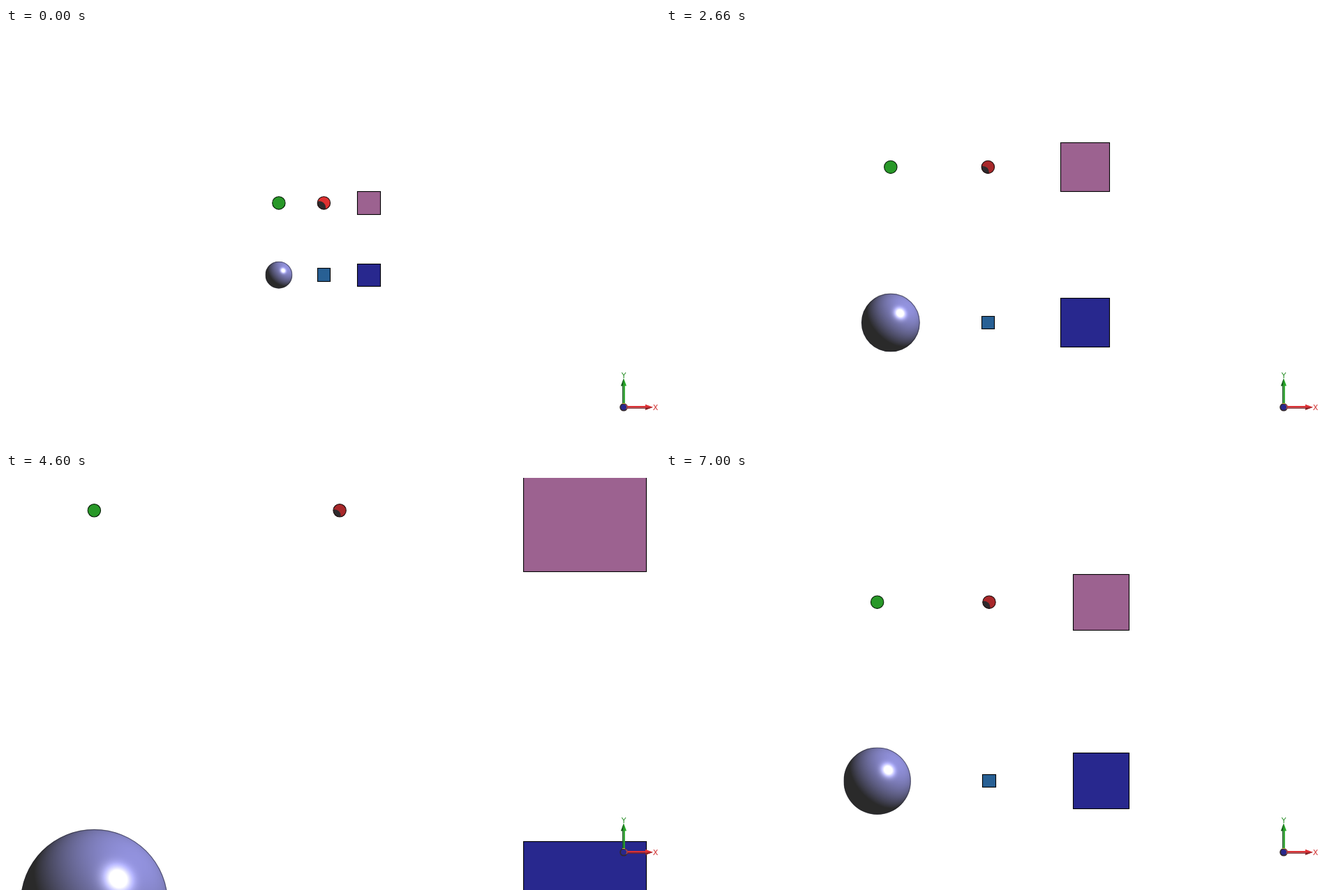
These frames come from a looping animation (937 by 598 pixels, 8.13 s). An HTML page with a canvas:

```html
<!DOCTYPE html>
<html lang="en">
<head>
<meta charset="utf-8">
<title>Zooming markers</title>
<style>
  html, body { margin: 0; width: 100%; height: 100%; overflow: hidden; background: #fff; }
  canvas { display: block; }
</style>
</head>
<body>
<canvas id="stage" width="937" height="598"></canvas>
<script>
const ctx = document.getElementById('stage').getContext('2d');
const LOOP = 8130, TAU = Math.PI * 2, VIEW_TOP = 7;
const zoomIn = [1160, 1560, 1930, 2340, 2660, 3190, 3510, 3820, 3970, 4200, 4600, 4920, 5130];
const zoomOut = [5530, 5760, 5910, 6310, 6620, 7000];
const passed = (times, t) => times.filter(at => at <= t).length;

// Phong-shaded ball lit from the upper right, rendered once and scaled when drawn.
function renderBall(size) {
  const ball = document.createElement('canvas');
  ball.width = ball.height = size;
  const c = ball.getContext('2d'), image = c.createImageData(size, size);
  const half = size / 2, dark = 42, lit = [146, 146, 222];
  for (let y = 0, i = 0; y < size; y++) {
    for (let x = 0; x < size; x++) {
      let nx = (x + 0.5 - half) / half, ny = (half - y - 0.5) / half;
      const len = Math.max(1, Math.hypot(nx, ny));
      nx /= len;
      ny /= len;
      const nz = Math.sqrt(Math.max(0, 1 - nx * nx - ny * ny));
      const diffuse = Math.max(0, (nx + ny + nz) * 0.577);
      const shine = diffuse && 190 * Math.max(0, 0.325 * (nx + ny) + 0.888 * nz) ** 55;
      for (const level of lit) image.data[i++] = dark + (level - dark) * diffuse + shine;
      image.data[i++] = 255;
    }
  }
  c.putImageData(image, 0, 0);
  return ball;
}
const ballImage = renderBall(300);

function disc(x, y, r, fill, stroke) {
  ctx.beginPath();
  ctx.arc(x, y, r, 0, TAU);
  if (fill) { ctx.fillStyle = fill; ctx.fill(); }
  if (stroke) { ctx.strokeStyle = stroke; ctx.stroke(); }
}

function box(x, y, half, fill) {
  const snap = v => Math.floor(v) + 0.5;
  const left = snap(x - half), top = snap(y - half);
  const w = snap(x + half) - left, h = snap(y + half) - top;
  ctx.fillStyle = fill;
  ctx.fillRect(left, top, w, h);
  ctx.strokeStyle = '#000';
  ctx.strokeRect(left, top, w, h);
}

function bigBall(x, y, r) {
  ctx.save();
  ctx.beginPath();
  ctx.arc(x, y, r, 0, TAU);
  ctx.clip();
  ctx.drawImage(ballImage, x - r, y - r, 2 * r, 2 * r);
  ctx.restore();
  disc(x, y, r - 0.4, null, 'rgba(30,30,40,.5)');
}

function redBall(x, y, bright) {
  const r = 9.2, away = (bright ? 9 : 10.5) * Math.SQRT1_2;
  ctx.save();
  disc(x, y, r, bright ? '#de3030' : '#a8282a');
  ctx.clip();
  disc(x - away, y + away, 9, '#2e2a2c');
  ctx.restore();
  disc(x, y, r, null, '#1c0c0c');
}

function shape(fill, points) {
  ctx.beginPath();
  points.forEach(([x, y]) => ctx.lineTo(x, y));
  ctx.fillStyle = fill;
  ctx.fill();
}

function axis(angle, length, light, shade) {
  ctx.save();
  ctx.translate(885, 543.8);
  ctx.rotate(angle);
  const side = angle ? -1 : 1;
  const bar = (fill, a, b) => {
    shape(fill, [[5, a * side], [length - 10, a * side], [length - 10, b * side], [5, b * side]]);
  };
  bar(light, -1.8, 0.6);
  bar(shade, 0.6, 2);
  shape(light, [[length - 11, -4], [length, 0], [length - 11, 4]]);
  shape(shade, [[length - 11, 1 * side], [length, 0], [length - 11, 4 * side]]);
  ctx.restore();
}

function triad() {
  axis(-Math.PI / 2, 41.5, '#26a526', '#1c5a24');
  axis(0, 42, '#dc3034', '#7c2428');
  disc(885, 543.8, 5.8, '#33292d');
  disc(887, 543.2, 3.8, '#a84848');
  disc(885, 543.8, 4, '#28288c');
  ctx.fillStyle = '#c8a83c';
  ctx.fillRect(883, 538, 4, 1);
  ctx.font = '11px "DejaVu Sans", sans-serif';
  ctx.textAlign = 'center';
  ctx.fillStyle = '#208a20';
  ctx.fillText('Y', 885, 502);
  ctx.fillStyle = '#d03030';
  ctx.fillText('X', 930.5, 548);
}

function draw(t) {
  const ins = passed(zoomIn, t), outs = passed(zoomOut, t), step = ins + outs;
  const unit = 64.53 * (7 / 6) ** ins * (5 / 6) ** outs;
  const [left, middle, right] = [-0.921, 0.079, 1.079].map(k => 450.3 + k * unit);
  const [top, bottom] = [-0.6865, 0.9135].map(k => 295.2 + k * unit);

  ctx.fillStyle = '#fff';
  ctx.fillRect(0, 0, 937, 598);
  ctx.save();
  ctx.beginPath();
  ctx.rect(0, VIEW_TOP, 937, 598 - VIEW_TOP);
  ctx.clip();
  ctx.lineWidth = 1.1;
  ctx.imageSmoothingQuality = 'high';
  disc(left, top, 9.2, '#289828', '#061c06');
  redBall(middle, top, step < 3 || (step > 11 && step < 16));
  bigBall(left, bottom, 0.3 * unit);
  box(middle, bottom, 9.3, '#286094');
  box(right, top, unit / 4, '#9c6290');
  box(right, bottom, unit / 4, '#28288e');
  triad();
  ctx.restore();
}

const start = performance.now();
function tick() {
  draw((performance.now() - start) % LOOP);
  requestAnimationFrame(tick);
}
tick();
</script>
</body>
</html>
```
